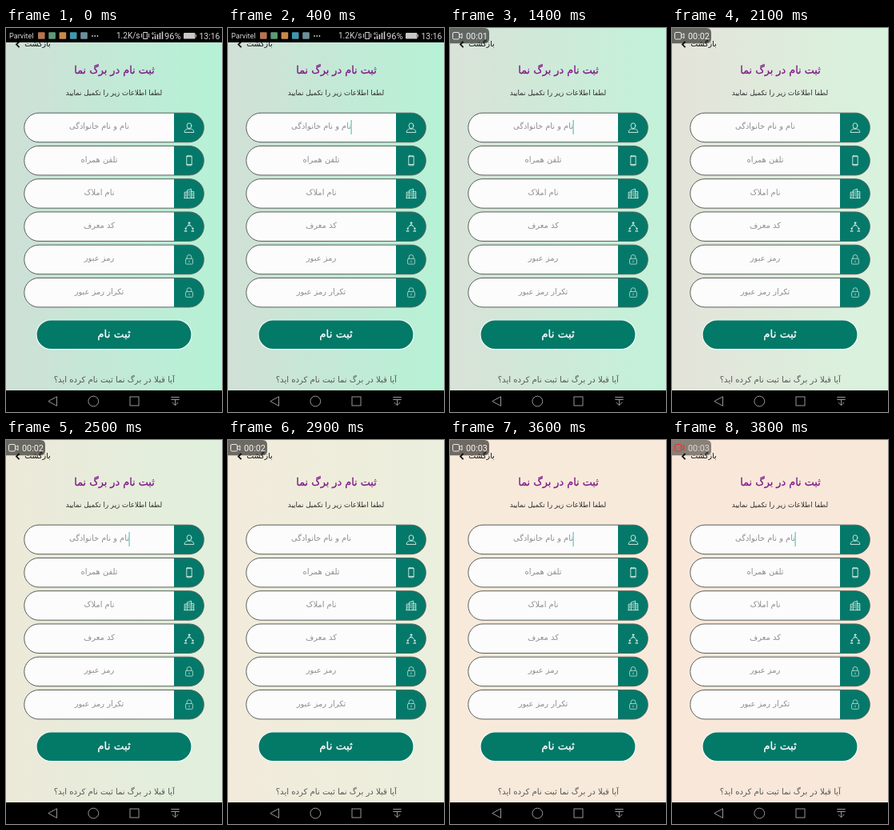
Recreate the animation shown at these times as an HTML page. Size 270 by 480 pixels, loop 3900 ms.

```html
<!DOCTYPE html>
<html lang="fa">
<head>
<meta charset="utf-8">
<title>ثبت نام</title>
<style>
  html, body { margin: 0; width: 100%; height: 100%; overflow: hidden; background: #000; }
  svg { display: block; width: 100%; height: 100%; }
  .fa { font-family: "DejaVu Sans", "Noto Sans", sans-serif; direction: rtl; text-anchor: middle; }
  .en { font-family: Roboto, "Open Sans", sans-serif; fill: #d6d6d6; }
  .hint { font-size: 9.9px; fill: #8d8d90; }
  .heavy { stroke-width: .3; }
  .line { fill: none; stroke: #e6f2ee; stroke-width: .85; stroke-linejoin: round; stroke-linecap: round; }
  .nav { fill: none; stroke: #969696; stroke-width: 1; }
</style>
</head>
<body>
<svg viewBox="0 0 270 480" preserveAspectRatio="none">
  <defs>
    <linearGradient id="bg" x1="0" y1="0" x2="1" y2="0">
      <stop id="left" offset="0"/>
      <stop id="right" offset="1"/>
    </linearGradient>
    <g id="person" class="line">
      <ellipse cx="0" cy="-2.3" rx="2.9" ry="3.4"/>
      <path d="M-5.8 5.6C-5.8 3-4.4 2.6-1.9 1.4Q0 2.4 1.9 1.4C4.4 2.6 5.8 3 5.8 5.6Z"/>
    </g>
    <g id="phone" class="line">
      <rect x="-3.2" y="-6" width="6.4" height="12" rx=".8"/>
      <path d="M-3-5.1H3M-3 4.8H3"/>
    </g>
    <g id="tower" class="line">
      <path d="M-5.8 5.6V-1.8H-2.6M-2.6 5.6V-4L2.6-5.8V5.6M2.6-2.6H5.8V5.6M-6.2 5.6H6.2"/>
      <path d="M-.9-2.5V3.8M.9-3V3.8M4.2-.6V4M-4.2 .3V4" stroke-dasharray=".8 1.4"/>
    </g>
    <g id="tree" class="line">
      <circle cx="0" cy="-4.6" r=".9" fill="#e6f2ee"/>
      <path d="M-1.6-1.8Q0-3.6 1.6-1.8ZM-1.8-1L-3.8 1.2M1.8-1L3.8 1.2"/>
      <circle cx="-4.4" cy="2.6" r=".7" fill="#e6f2ee"/>
      <circle cx="4.4" cy="2.6" r=".7" fill="#e6f2ee"/>
      <path d="M-5.8 5.5Q-4.4 3.8-3 5.5ZM3 5.5Q4.4 3.8 5.8 5.5Z"/>
    </g>
    <g id="lock" class="line" opacity=".8">
      <rect x="-4.4" y="-1.2" width="8.8" height="6.8" rx=".8"/>
      <path d="M-2.8-1.2V-3.2A2.8 2.8 0 0 1 2.8-3.2V-1.2M0 1.3V3.2"/>
    </g>
  </defs>

  <rect width="270" height="453" fill="url(#bg)"/>

  <path d="M16.6 17L13 20.6L16.6 24.2" fill="none" stroke="#111" stroke-width="1.8"/>
  <text class="fa" x="39.5" y="23" font-size="9.5" fill="#151515">بازگشت</text>
  <text class="fa heavy" x="135.5" y="56.8" font-size="12.8" fill="#7f1a88" stroke="#7f1a88">ثبت نام در برگ نما</text>
  <text class="fa" x="135" y="83.7" font-size="8.7" fill="#2c2c2c">لطفا اطلاعات زیر را تکمیل نمایید</text>

  <g id="fields"></g>
  <rect id="caret" x="153.4" y="115" width="1.5" height="18" fill="#6fd6c6"/>

  <rect x="38" y="364.8" width="194" height="36.8" rx="18.4" fill="#037968" stroke="#f2faf5" stroke-width="1.2"/>
  <text class="fa heavy" x="135" y="387" font-size="13.5" fill="#fff" stroke="#fff">ثبت نام</text>
  <text class="fa" x="135.3" y="442.7" font-size="10.1" fill="#565656">آیا قبلا در برگ نما ثبت نام کرده اید؟</text>

  <rect y="453" width="270" height="27" fill="#000"/>
  <g class="nav">
    <path d="M63.5 460.8V472.4L52.8 466.6Z"/>
    <circle cx="109.3" cy="466.6" r="6.4"/>
    <rect x="155" y="461" width="11" height="11"/>
    <path d="M206.3 461.5H216.7M206.3 464.5H216.7M211.5 464.5V471.5M207.8 468L211.5 471.8L215.2 468"/>
  </g>

  <g id="status">
    <rect width="270" height="18" fill="#000"/>
    <text class="en" x="4" y="13" font-size="9.1">Parvitel</text>
    <g id="apps"></g>
    <g fill="#ccc">
      <circle cx="108" cy="10" r=".9"/><circle cx="111.2" cy="10" r=".9"/><circle cx="114.4" cy="10" r=".9"/>
    </g>
    <text id="speed" class="en" x="138" y="13" font-size="10"></text>
    <g fill="none" stroke="#d0d0d0">
      <rect x="171.8" y="5.5" width="4.6" height="8"/>
      <path d="M169.6 7V12M178.6 7V12"/>
    </g>
    <text class="en" x="181.5" y="8.5" font-size="5">4G</text>
    <path d="M183.5 14V11M186.5 14V9.5M189.5 14V8M192.5 14V6M195.5 14V4.5" stroke="#d0d0d0" stroke-width="1.5"/>
    <text class="en" x="198" y="13.5" font-size="11.2">96%</text>
    <rect x="222" y="6" width="14.5" height="7.6" rx="1.2" fill="#c8c8c8"/>
    <path d="M237.4 8.2V11.4" stroke="#c8c8c8"/>
    <text class="en" x="241.5" y="13.5" font-size="10.4">13:16</text>
  </g>

  <g id="timer">
    <path id="pill" d="M0 0H43Q49 0 49 6V13.2Q49 19.2 43 19.2H0Z" fill="#000"/>
    <g id="cam" fill="none" stroke="#fff">
      <rect x="3.5" y="5.5" width="8" height="8.5" rx="1.5"/>
      <path d="M11.5 9L15 6.8V12.8L11.5 10.6"/>
    </g>
    <text id="clock" class="en" x="20" y="14" font-size="10.8" style="fill:#fff"></text>
  </g>
</svg>
<script>
const LOOP = 3900;
const $ = id => document.getElementById(id);

const rows = [
  ["نام و نام خانوادگی", "person"],
  ["تلفن همراه", "phone"],
  ["نام املاک", "tower"],
  ["کد معرف", "tree"],
  ["رمز عبور", "lock"],
  ["تکرار رمز عبور", "lock"]
];
$("fields").innerHTML = rows.map(([label, icon], i) => `
  <g transform="translate(0 ${(105.7 + i * 41.25).toFixed(2)})">
    <rect x="22.8" y="0.5" width="224.5" height="36.5" rx="18.2" fill="#fdfcfd"/>
    <path d="M210 .5H229.1A18.2 18.2 0 0 1 229.1 37H210Z" fill="#04796a"/>
    <rect x="22.8" y="0.5" width="224.5" height="36.5" rx="18.2" fill="none" stroke="#56605a"/>
    <text class="fa hint" x="116.5" y="20.7">${label}</text>
    <use href="#${icon}" x="229" y="18.8"/>
  </g>`).join("");

$("apps").innerHTML = ["#b5754f", "#5f9a78", "#c88a4a", "#3f97ae", "#6d8f9c"].map((color, i) =>
  `<rect x="${40 + i * 13.3}" y="5.2" width="8.6" height="8.6" rx="1" fill="${color}"/>`).join("");

// time, left colour, right colour
const tones = [
  [0, [207, 224, 214], [181, 242, 214]],
  [1100, [212, 225, 215], [185, 241, 215]],
  [2100, [228, 227, 217], [216, 243, 222]],
  [2500, [237, 233, 217], [224, 240, 221]],
  [3300, [246, 236, 220], [246, 238, 221]],
  [3800, [249, 232, 218], [248, 232, 218]]
];

function mix(a, b, k) {
  return `rgb(${a.map((v, i) => Math.round(v + (b[i] - v) * k))})`;
}

function paintBackdrop(t) {
  let i = 0;
  while (i < tones.length - 2 && t >= tones[i + 1][0]) i++;
  const [t0, l0, r0] = tones[i], [t1, l1, r1] = tones[i + 1];
  const k = Math.min(1, (t - t0) / (t1 - t0));
  $("left").setAttribute("stop-color", mix(l0, l1, k));
  $("right").setAttribute("stop-color", mix(r0, r1, k));
}

const show = (id, on) => $(id).setAttribute("visibility", on ? "visible" : "hidden");

function draw(time) {
  const t = Math.floor((time % LOOP) / 100) * 100;
  const fading = t >= 3700;
  paintBackdrop(t);
  show("caret", t >= 350 && (t - 350) % 1010 < 450);
  show("status", t < 1300);
  show("timer", t >= 1100);
  $("speed").textContent = t < 1100 ? "1.2K/s" : "0.9K/s";
  $("clock").textContent = "00:0" + Math.floor(t / 1000);
  $("clock").setAttribute("opacity", fading ? 0.7 : 0.92);
  $("pill").setAttribute("opacity", fading ? 0.45 : 0.55);
  $("cam").setAttribute("stroke", fading ? "#e8322c" : "#e8e8e8");
}

const start = performance.now();
function tick() {
  draw(performance.now() - start);
  requestAnimationFrame(tick);
}
tick();
</script>
</body>
</html>
```
